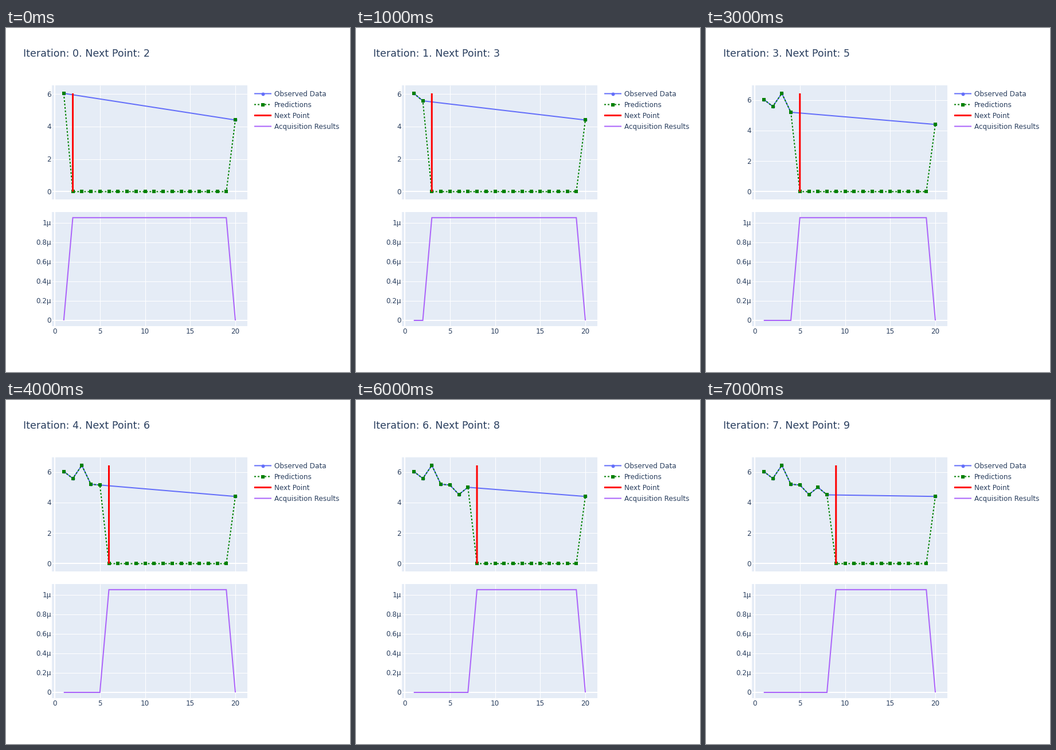
Recreate the animation shown at these times as a matplotlib script. Size 600 by 600 pixels, loop 8000 ms.

```python
import matplotlib.pyplot as plt
from matplotlib.animation import FuncAnimation
from matplotlib.patches import Rectangle
import numpy as np

SIZE, DPI = 600, 100
PT = 72 / DPI                      # points per pixel
INK, PANEL = "#2a3f5f", "#e5ecf6"
BLUE, GREEN, RED, PURPLE = "#636efa", "#008000", "#ff0000", "#ab63fa"

LEFT, RIGHT = 80, 421
TOP = (100, 299)
BOTTOM = (321, 520)
TOP_ZERO, TOP_PEAK = 285.4, 114
LOW_ZERO, LOW_PEAK, LOW_STEP = 510, 330.8, 34

VALUES = [6.05, 5.59, 6.45, 5.21, 5.16, 4.54, 5.01, 4.515]
LAST_X, LAST_VALUE = 20, 4.41
XS = np.arange(1, LAST_X + 1)

plt.rcParams["font.family"] = "DejaVu Sans"
fig = plt.figure(figsize=(SIZE / DPI, SIZE / DPI), dpi=DPI, facecolor="white")
ax = fig.add_axes([0, 0, 1, 1])


def px(x):
    return 85 + 15.75 * np.asarray(x)


def line(x, y, color, width=2, dotted=False, marker=None, snap=False, z=3):
    style = (0, (3 / width, 3 / width)) if dotted else "-"
    ax.plot(x, y, color=color, lw=width * PT, ls=style, snap=snap, zorder=z,
            solid_capstyle="butt", dash_capstyle="butt",
            solid_joinstyle="miter", dash_joinstyle="miter")
    if marker:
        ax.plot(np.mean(x) if marker == "o" and len(x) == 0 else x, y, marker,
                color=color, ms=6 * PT, mew=0, zorder=z)


def dots(x, y, color, marker):
    ax.plot(x, y, marker, color=color, ms=6 * PT, mew=0, zorder=3)


def label(x, y, text, size=12, ha="left"):
    ax.text(x, y, text, fontsize=size * PT, color=INK, ha=ha, va="baseline")


def grid(x, y, zero=False):
    line(x, y, "white", 2 if zero else 1, snap=True, z=2)


def panel(span, ticks):
    """Background, grid and left labels; ticks are (y, text), zero first."""
    ax.add_patch(Rectangle((LEFT, span[0]), RIGHT - LEFT, span[1] - span[0],
                           fc=PANEL, lw=0, zorder=1))
    for x in (5, 10, 15, 20, 0):
        grid([px(x)] * 2, span, x == 0)
    for i, (y, text) in enumerate(ticks):
        grid((LEFT, RIGHT), [y] * 2, i == 0)
        label(79, y + 4.3, text, ha="right")


def legend():
    rows = [("Observed Data", BLUE, 2, "o"), ("Predictions", GREEN, 2, "s"),
            ("Next Point", RED, 3, None), ("Acquisition Results", PURPLE, 2, None)]
    for i, (text, color, width, marker) in enumerate(rows):
        y = 114.5 + 19 * i
        line((433, 463), (y, y), color, width, dotted=marker == "s")
        if marker:
            dots([448], [y], color, marker)
        label(468, y + 4.4, text)


def draw(step):
    ax.clear()
    ax.set(xlim=(0, SIZE), ylim=(SIZE, 0))
    ax.axis("off")

    target = step + 2
    known = VALUES[:step + 1]
    scale = (TOP_ZERO - TOP_PEAK) / max(known)

    def py(v):
        return TOP_ZERO - scale * np.asarray(v)

    panel(TOP, [(float(py(v)), str(v)) for v in (0, 2, 4, 6)])
    names = ["0", "0.2µ", "0.4µ", "0.6µ", "0.8µ", "1µ"]
    panel(BOTTOM, [(LOW_ZERO - LOW_STEP * i, t) for i, t in enumerate(names)])
    for x in range(0, 21, 5):
        label(px(x), 533, str(x), ha="center")

    seen_x = px(list(range(1, target)) + [LAST_X])
    seen_y = py(known + [LAST_VALUE])
    line(seen_x, seen_y, BLUE)
    dots(seen_x, seen_y, BLUE, "o")

    guess = py(known + [0] * (LAST_X - target) + [LAST_VALUE])
    line(px(XS), guess, GREEN, dotted=True)
    dots(px(XS), guess, GREEN, "s")
    line([px(target)] * 2, (TOP_ZERO, TOP_PEAK), RED, 3)

    open_points = (XS >= target) & (XS < LAST_X)
    line(px(XS), np.where(open_points, LOW_PEAK, LOW_ZERO), PURPLE)

    legend()
    label(30, 50, f"Iteration: {step}. Next Point: {target}", 17.5)
    return []


anim = FuncAnimation(fig, draw, frames=8, interval=1000, init_func=lambda: [],
                     repeat=True, repeat_delay=0)
plt.show()
```
